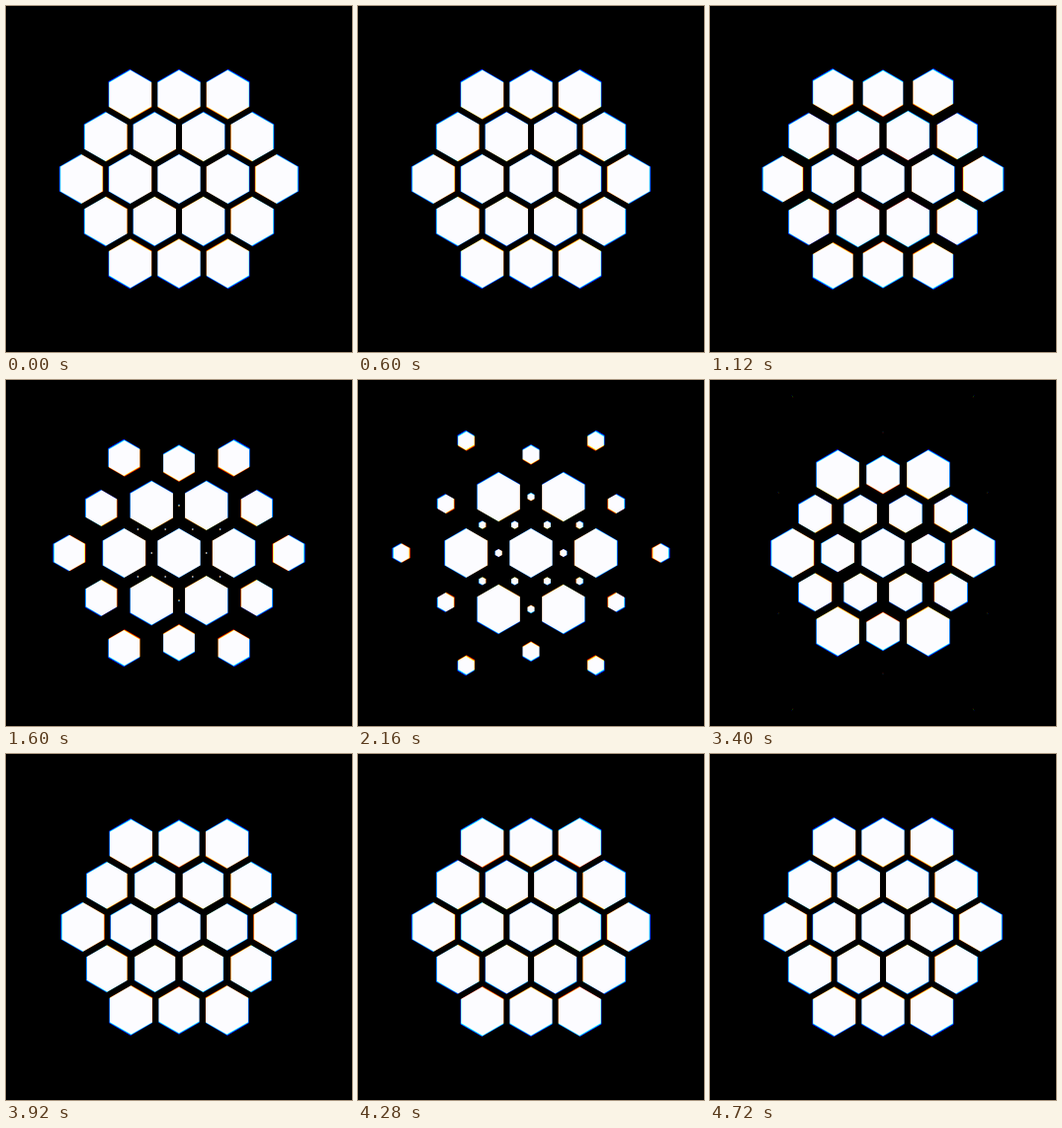
Recreate the animation shown at these times as an HTML page with a canvas. Size 350 by 350 pixels, loop 4760 ms.

```html
<!DOCTYPE html>
<html lang="en">
<head>
<meta charset="utf-8">
<title>Hexagon zoom loop</title>
<style>
  html, body { margin: 0; width: 100%; height: 100%; overflow: hidden; background: #000; }
  canvas { display: block; }
</style>
</head>
<body>
<canvas id="stage" width="350" height="350"></canvas>
<script>
const ctx = document.getElementById('stage').getContext('2d');
const LOOP = 4760, START = 520, LENGTH = 4040;
const SPACING = 49.4, RADIUS = 25, H = Math.sqrt(3) / 2;

// Each colour channel is scaled slightly about the centre, giving radial fringes.
const CHANNELS = [['#fc0000', 0.994], ['#00fc00', 1], ['#0000ff', 1.006]];

const smoother = u => u * u * u * (u * (6 * u - 15) + 10);

function hexagon(x, y, r) {
  for (let i = 0; i < 6; i++) {
    const a = (i + 0.5) * Math.PI / 3;
    ctx[i ? 'lineTo' : 'moveTo'](x + r * Math.cos(a), y + r * Math.sin(a));
  }
  ctx.closePath();
}

// Six hexagons at one distance; turn 0 points at corners, 0.5 at edge middles.
function ring(distance, turn, scale) {
  if (scale < 0.002) return;
  for (let i = 0; i < 6; i++) {
    const a = (i + turn) * Math.PI / 3;
    hexagon(distance * Math.cos(a), distance * Math.sin(a), RADIUS * scale);
  }
}

function draw(time) {
  const p = smoother(Math.min(1, Math.max(0, (time % LOOP - START) / LENGTH)));
  const d = SPACING * (1 + p);
  const fading = (1 - p) ** 2.35;
  const growing = p ** 1.62;

  ctx.setTransform(1, 0, 0, 1, 0, 0);
  ctx.globalCompositeOperation = 'source-over';
  ctx.fillStyle = '#000';
  ctx.fillRect(0, 0, 350, 350);
  ctx.globalCompositeOperation = 'lighter';

  for (const [color, zoom] of CHANNELS) {
    ctx.setTransform(zoom, 0, 0, zoom, 175, 175);
    ctx.fillStyle = color;
    ctx.beginPath();
    hexagon(0, 0, RADIUS);
    ring(d, 0, 1);
    ring(2 * d, 0, fading);
    ring(H * (d + SPACING), 0.5, fading);
    ring(d / 2, 0, growing);
    ring(H * d, 0.5, growing);
    ctx.fill();
  }
}

function tick() {
  draw(performance.now());
  requestAnimationFrame(tick);
}
tick();
</script>
</body>
</html>
```
